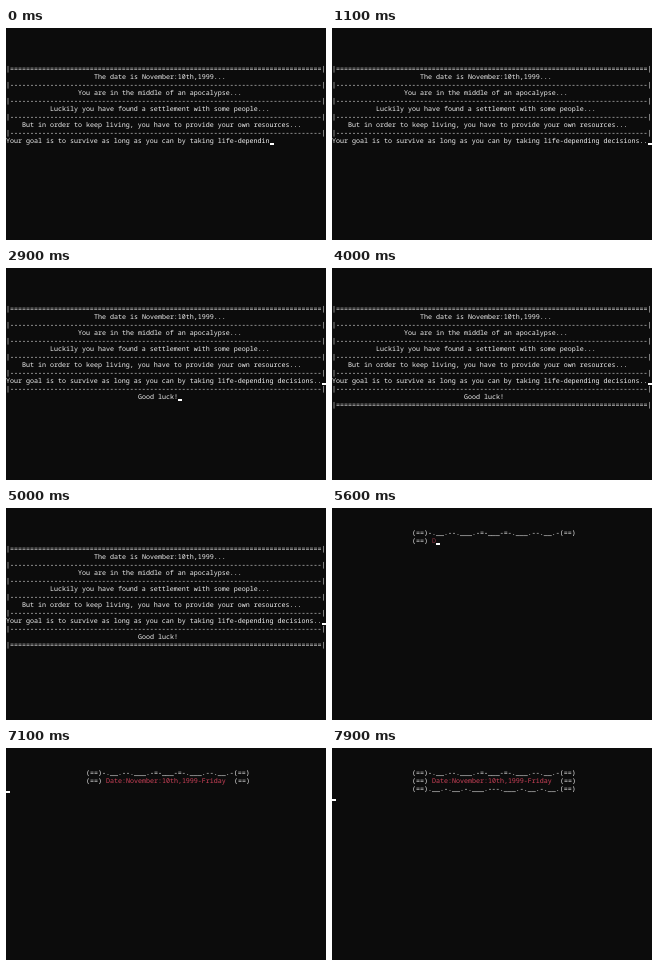
These frames come from a looping animation (320x212 px, 8000 ms). An HTML page:

```html
<!DOCTYPE html>
<html lang="en">
<head>
<meta charset="utf-8">
<title>Console story</title>
<style>
  html, body { margin: 0; height: 100%; overflow: hidden; background: #0c0c0c; }
  svg { display: block; width: 100vw; height: 100vh; }
  text {
    font: 6.6667px "Noto Sans Mono", "DejaVu Sans Mono", monospace;
    fill: #f2f2f2;
    white-space: pre;
    text-rendering: geometricPrecision;
  }
</style>
</head>
<body>
<svg id="screen" viewBox="0 0 320 212"></svg>
<script>
const LOOP = 8000, CELL_W = 4, CELL_H = 8, TOP = 5;
const RED = '#d0435a', DIM_RED = '#8c3442';
const screen = document.getElementById('screen');

const rule = c => '|' + c.repeat(78) + '|';
const intro = [
  [22, 'The date is November:10th,1999...'],
  [18, 'You are in the middle of an apocalypse...'],
  [11, 'Luckily you have found a settlement with some people...'],
  [4, 'But in order to keep living, you have to provide your own resources...']
];
const goal = 'Your goal is to survive as long as you can by taking life-depending decisions..';
const luck = 'Good luck!';
const date = 'Date:November:10th,1999-Friday';
const scrollTop = '(==)-.__.--.___.-=-___-=-.___.--.__.-(==)';
const scrollEnd = '(==).__.-.__.-.___.---.___.-.__.-.__.(==)';

const put = (col, row, s, color = '#f2f2f2') =>
  `<text x="${col * CELL_W}" y="${TOP + row * CELL_H + 6}" style="fill:${color}">${s}</text>`;
const cursor = (col, row) =>
  `<rect x="${col * CELL_W}" y="${TOP + row * CELL_H + 6}" width="4" height="2" fill="#fff"/>`;

// Characters typed at time t, going from n0 at t0 to n1 at t1
function typed(t, t0, t1, n0, n1) {
  const k = Math.min(1, Math.max(0, (t - t0) / (t1 - t0)));
  return Math.round(n0 + k * (n1 - n0));
}

function story(t) {
  let out = put(0, 4, rule('='));
  intro.forEach(([col, s], i) => {
    out += put(col, 5 + 2 * i, s) + put(0, 6 + 2 * i, rule('-'));
  });
  const n = typed(t, 0, 1100, 66, 79);
  out += put(0, 13, goal.slice(0, n)) + cursor(n, 13);
  if (t < 1200) return out;

  out += put(0, 14, rule('-'));
  const m = t < 2200 ? 0 : typed(t, 2200, 2900, 1, 10);
  out += put(33, 15, luck.slice(0, m));
  if (t < 3000) return out + (t >= 1900 && t < 2200 ? '' : cursor(33 + m, 15));

  out += put(0, 16, rule('='));
  const on = t < 4000 || (t >= 4500 && t < 5000);
  return out + (on ? cursor(79, 16) : '');
}

function dateTyped(t) {
  if (t < 5800) return 1;
  if (t < 6000) return 2;
  if (t < 6300) return 3;
  if (t < 6500) return 4;
  return typed(t, 6600, 7000, 5, date.length);
}

function calendar(t) {
  const n = dateTyped(t);
  let out = put(20, 2, scrollTop) + put(20, 3, '(==)') +
    put(25, 3, date.slice(0, n), t < 5800 ? DIM_RED : RED);
  if (t < 7100) return out + cursor(25 + n, 3);
  out += put(57, 3, '(==)');
  if (t < 7200) return out + cursor(0, 4);
  out += put(20, 4, scrollEnd);
  return out + (t < 7300 ? cursor(61, 4) : cursor(0, 5));
}

let last = -1;
function draw() {
  const t = Math.floor(performance.now() % LOOP / 100) * 100;
  if (t !== last) {
    screen.innerHTML = t < 5600 ? story(t) : calendar(t);
    last = t;
  }
  requestAnimationFrame(draw);
}
draw();
</script>
</body>
</html>
```
